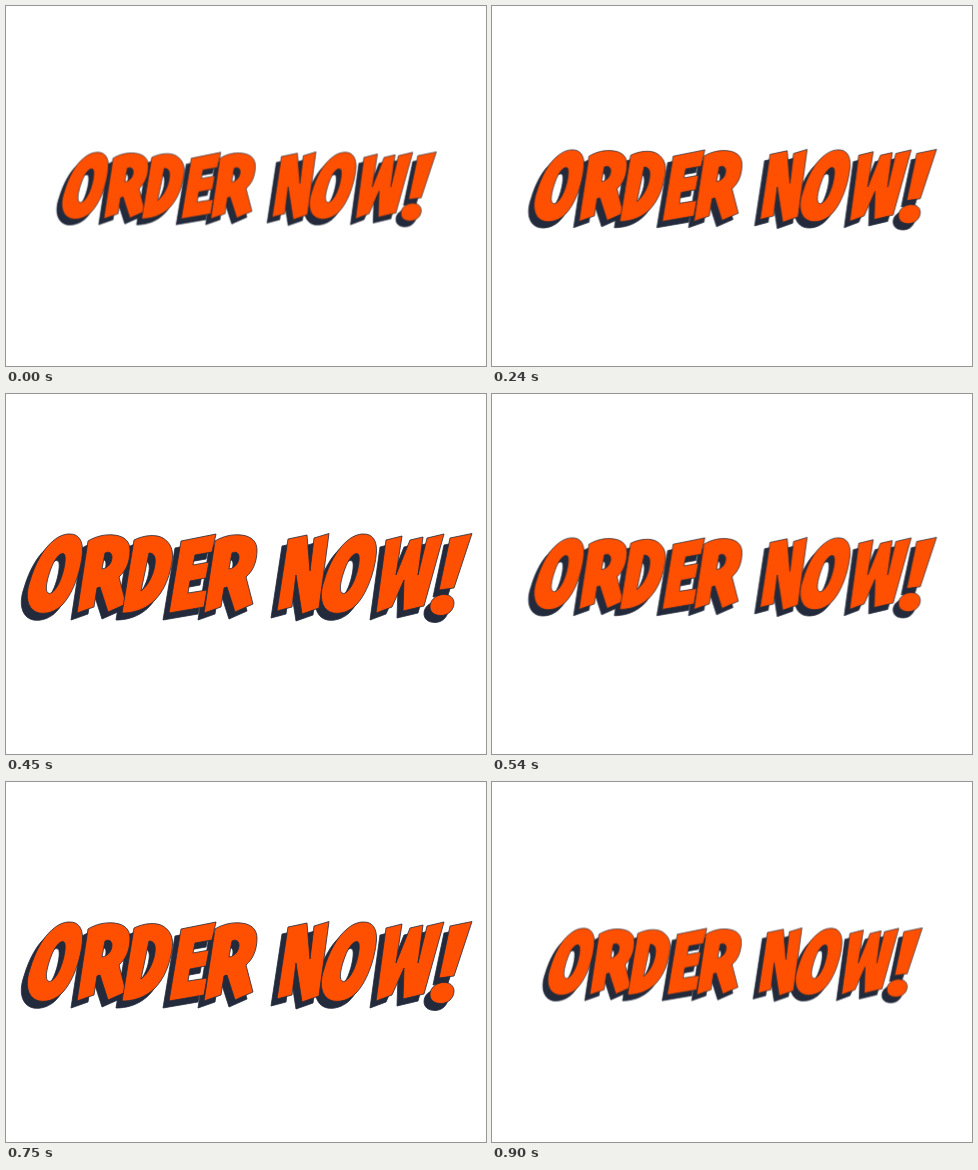
An HTML page for the animation above (1080 ms loop, 480 by 360 pixels).

```html
<!DOCTYPE html>
<html lang="en">
<head>
<meta charset="utf-8">
<title>Order now!</title>
<style>
  html, body { margin: 0; width: 100%; height: 100%; overflow: hidden; background: #fff; }
  svg { display: block; width: 100vw; height: 100vh; }
  #pulse { transform-origin: 240px 180px; }
  .face { fill: #ff4f00; stroke: #232a3b; stroke-width: 0.8; }
  .shade { fill: #232a3b; stroke: #232a3b; stroke-width: 0.8; }
  path { fill-rule: evenodd; stroke-linejoin: round; }
</style>
</head>
<body>
<svg viewBox="0 0 480 360" role="img" aria-label="ORDER NOW!">
  <defs>
    <path id="o" d="M63 140C73 139.500 77 147 76.500 158C75 178 66 202 55 212C47 219.500 34 222 27 216C20 210 20 198 24 187C29 170 37 155 47 147C52 142.500 58 140 63 140Z
      M58 160C61 162 58 178 54 187C50 196 45 201 42 199C38 196 42 182 46 172C50 163 55 158 58 160Z"/>
    <path id="r" d="M82 147C90 142 100 140 108 141C119 142 124 148 124 156C124 168 120 177 113 183L120 210L102 218L94 193L91 194L88 213L71 219Z
      M99 159L96 175C102 174 106 169 106 163C106 159 103 157 99 159Z"/>
    <path id="d" d="M128 146C138 141 150 140 157 144C165 149 168 157 166 168C163 187 155 203 143 211C135 216.500 126 219 116 219Z
      M143 159L135 197C142 192 148 180 149 170C150 163 148 159 143 159Z"/>
    <path id="e" d="M175 147L210 140L206 158L189 161L187 171L203 168L200 184L184 187L182 199L201 196L198 213L163 219Z"/>
    <path id="n" d="M282 145L301 141L304 177L308 144L323 139.500L313 214L296 220L290 181L286 213L271 217Z"/>
    <path id="w" d="M380 146L396 142L390 181L404 146L417 143L412 181L421 144L438 140L418 212L397 217L398 186L386 213L370 219Z"/>
    <path id="mark" d="M444 144L466 139.500L448 194L433 196ZM437 200.500C444 200 448 204 448 209C448 216 442 221.500 435 221.500C428 221.500 424 218 424 212.500C424 206 430 201 437 200.500Z"/>
    <g id="word">
      <use href="#o"/><use href="#r"/><use href="#d"/><use href="#e"/><use href="#r" x="127"/>
      <use href="#n"/><use href="#o" x="294"/><use href="#w"/><use href="#mark"/>
    </g>
  </defs>
  <g id="pulse">
    <use href="#word" class="shade" x="-6" y="7"/>
    <use href="#word" class="face"/>
  </g>
</svg>
<script>
  const LOOP = 1080, HALF = 150, SMALL = 0.842;
  const key = (ms, s) => ({ offset: ms / LOOP, transform: `scale(${s})`, easing: "steps(5)" });
  // three grow-and-shrink beats, then a rest
  const keys = [];
  for (let i = 0; i <= 6; i++) keys.push(key(i * HALF, i % 2 ? 1 : SMALL));
  keys.push(key(LOOP, SMALL));
  document.getElementById("pulse").animate(keys, { duration: LOOP, iterations: Infinity });
</script>
</body>
</html>
```
